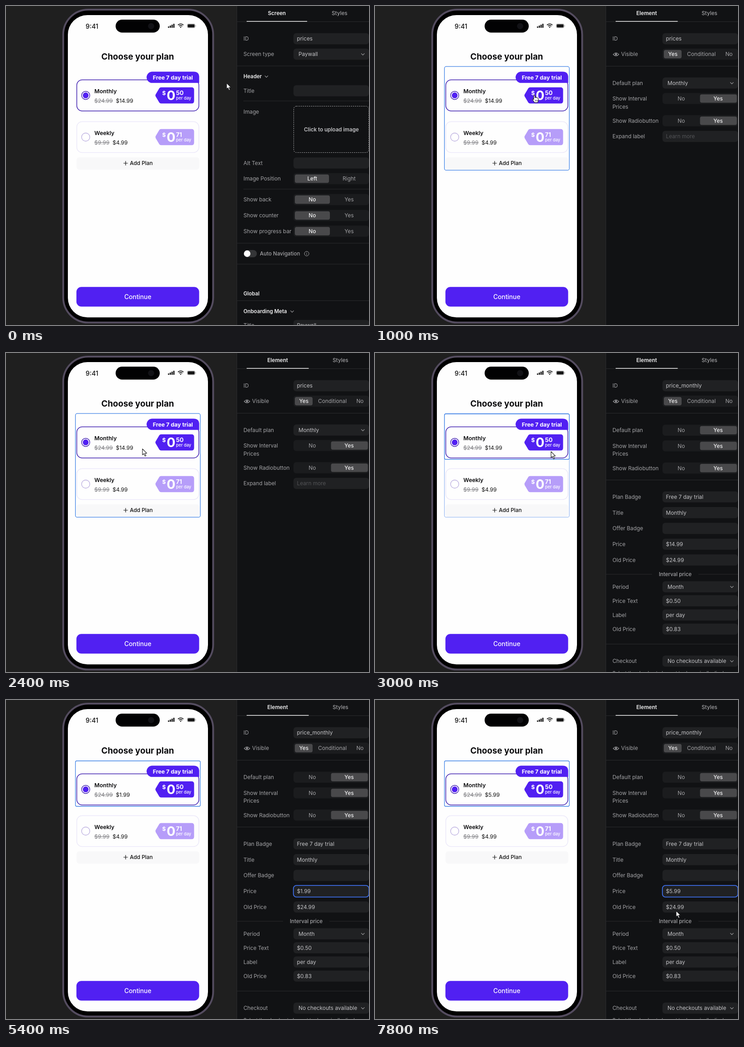
Animation, 798 px wide and 702 px high, one loop 8000 ms. Source, as an HTML page:

```html
<!DOCTYPE html>
<html lang="en">
<head>
<meta charset="utf-8">
<title>Paywall editor</title>
<style>
  html, body { margin: 0; width: 100%; height: 100%; overflow: hidden; background: #1f1f1f; }
  svg { display: block; width: 100vw; height: 100vh; }
  text { font-family: Inter, "Noto Sans", sans-serif; white-space: pre; }
</style>
</head>
<body>
<svg id="stage" viewBox="0 0 798 702" preserveAspectRatio="none"></svg>
<script>
const LOOP = 8000, STEP = 200;
const PURPLE = '#5120f2', EDGE = '#4020b0', BLUE = '#3f82e6';
const LABEL = '#a3a3a6', VALUE = '#c4c4c7', BRIGHT = '#f1f1f2';

// --- drawing helpers, all return markup ---
const el = (name, attrs, body = '') =>
  `<${name} ${Object.entries(attrs).map(([k, v]) => `${k}="${v}"`).join(' ')}>${body}</${name}>`;
const box = (x, y, w, h, rx, fill, more = {}) =>
  el('rect', { x, y, width: w, height: h, rx, fill, ...more });
const frame = (x, y, w, h, rx, stroke, sw, more = {}) =>
  box(x, y, w, h, rx, 'none', { stroke, 'stroke-width': sw, ...more });
const path = (d, more) => el('path', { d, fill: 'none', ...more });
const text = (x, y, s, size, weight, fill, more = {}) =>
  el('text', { x, y, 'font-size': size, 'font-weight': weight, fill, ...more }, s);
const centered = (x, y, s, size, weight, fill) =>
  text(x, y, s, size, weight, fill, { 'text-anchor': 'middle' });
const group = (id, body) => el('g', { id }, body);

// --- phone ---
function priceTag(dy, fill, cents) {
  return el('g', { transform: `translate(0 ${dy})` },
    path('M341 179H408Q413.5 179 413.5 184.500V209Q413.500 214.500 408 214.500H341Q338.500 214.500 337 212.500L329 199Q327.800 196.800 329 194.600L337 181Q338.500 179 341 179Z', { fill }) +
    text(343.3, 196.3, '$', 12.4, 700, '#fff') +
    text(353.3, 207.4, '0', 28.4, 700, '#fff') +
    text(373.7, 196.3, cents, 12.9, 700, '#fff') +
    text(373.7, 206.4, 'per day', 9.3, 500, '#fff'));
}

function oldPrice(y, s, width) {
  return text(194.3, y, s, 12, 400, '#7c7c80') +
    path(`M194 ${y - 4.2}h${width}`, { stroke: '#7c7c80', 'stroke-width': 1 });
}

function phone() {
  const bars = [3, 5, 7, 9].map((h, i) => box(356 + i * 3.9, 48 - h, 2.7, h, .8, '#111')).join('');
  const wifi = [[6, 41.8], [3.6, 44.3]].map(([r, y]) =>
    path(`M${384 - r} ${y}q${r} ${-r * .8} ${r * 2} 0`, { stroke: '#111', 'stroke-width': 1.8 })).join('') +
    path('M382.200 46.200q1.800 -1.500 3.600 0l-1.800 2z', { fill: '#111' });
  return box(125.8, 8, 329.6, 688.6, 55, '#000', { stroke: '#544c5f', 'stroke-width': 4 }) +
    box(136, 20, 308, 665.3, 43, '#fefefe') +
    text(175, 49.8, '9:41', 14.1, 500, '#111') +
    box(241, 30, 97, 28.5, 14.2, '#020203') +
    el('circle', { cx: 319, cy: 44.3, r: 6.8, fill: '#121216' }) +
    bars + wifi +
    frame(398.3, 39.2, 17.4, 9, 2.6, '#aaa', .9) + box(399.4, 40.2, 15.2, 7, 1.6, '#161616') +
    box(416.5, 42.2, 1.1, 3, .5, '#aaa') +
    centered(289.5, 118, 'Choose your plan', 18.7, 700, '#0c0c0e') +
    // monthly
    frame(155.6, 162.4, 268.4, 68.6, 12, EDGE, 1.5) +
    path('M321.500 144.500H412.500Q424.700 144.500 424.700 156.500V169.300H321.500A12.400 12.400 0 0 1 321.500 144.500Z', { fill: PURPLE }) +
    centered(366.8, 161.6, 'Free 7 day trial', 12.4, 700, '#fff') +
    el('circle', { cx: 175.2, cy: 196.7, r: 9, fill: '#fff', stroke: EDGE, 'stroke-width': 1.4 }) +
    el('circle', { cx: 175.2, cy: 196.7, r: 6.4, fill: PURPLE }) +
    text(194.3, 191.7, 'Monthly', 12.4, 600, '#0c0c0e') +
    oldPrice(213, '$24.99', 41) +
    text(241.5, 213, '', 12, 400, '#111', { id: 'planPrice' }) +
    priceTag(0, PURPLE, '50') +
    // weekly
    frame(155.6, 254.4, 268.4, 68.2, 12, '#ebe8f9', 1.5) +
    el('circle', { cx: 175.2, cy: 288.5, r: 9, fill: '#fff', stroke: '#b9acdf', 'stroke-width': 1.3 }) +
    text(194.3, 283.6, 'Weekly', 12.3, 600, '#0c0c0e') +
    oldPrice(304.8, '$9.99', 33.5) +
    text(234.2, 304.8, '$4.99', 12, 400, '#111') +
    priceTag(91.7, '#b69df9', '71') +
    box(155, 333, 270, 27, 6, '#f8f8f9') +
    path('M258.300 346h9.400M263 341.300v9.400', { stroke: '#111', 'stroke-width': 1.2 }) +
    text(272.2, 350.3, 'Add Plan', 11.8, 500, '#111') +
    box(154.8, 618.2, 269.8, 43.2, 11, PURPLE) +
    centered(289.7, 645, 'Continue', 13.8, 500, '#fff') +
    frame(152.6, 133.2, 274.6, 228.2, 4, BLUE, 1.3, { id: 'outerSel' }) +
    frame(152.6, 134, 274.6, 100, 3, BLUE, 1.3, { id: 'innerSel' });
}

// --- side panel ---
const SIZE = 11.8, BASE = 4.3;
const label = (y, s, x = 522) => text(x, y + BASE, s, SIZE, 400, LABEL);
const rule = (y, x = 508, end = 798) => path(`M${x} ${y}H${end}`, { stroke: '#2a2b2d', 'stroke-width': 1 });
const chevron = (x, y) => path(`M${x - 3.6} ${y - 1.7}l3.600 3.600l3.600 -3.600`, { stroke: LABEL, 'stroke-width': 1.1 });
const slot = y => box(632, y - 12.2, 166, 24.4, 6, '#202123');
const input = (y, s, fill = VALUE, id = '') =>
  slot(y) + text(639.5, y + BASE, s, SIZE, 400, fill, id ? { id } : {});
const select = (y, s) => slot(y) + text(643, y + BASE, s, SIZE, 400, VALUE) + chevron(784.5, y);
const heading = (y, s) => text(522, y + BASE, s, 11.4, 600, BRIGHT);

function choice(y, a, b, second, w = 77) {
  const x = second ? 714.5 : 635;
  return box(632, y - 12.2, 166, 24.4, 6, '#1b1c1e') +
    box(x, y - 9.2, second ? 81 : w, 18.4, 4, '#49494b') +
    centered(673.3, y + BASE, a, SIZE, second ? 400 : 500, second ? LABEL : BRIGHT) +
    centered(754.3, y + BASE, b, SIZE, second ? 500 : 400, second ? BRIGHT : LABEL);
}
const yesNo = (y, s, yes) => label(y, s) + choice(y, 'No', 'Yes', yes);

function tabs(first, x1, x2, end) {
  return centered(x1, 20.4, first, 11.6, 600, BRIGHT) + centered(x2, 20.4, 'Styles', 11.6, 500, LABEL) +
    rule(34.5) + box(529, 33, end - 529, 1.5, 0, '#ececec');
}

function screenPanel() {
  return tabs('Screen', 595.5, 733.3, 662) +
    label(72, 'ID') + input(72, 'prices') +
    label(106, 'Screen type') + select(106, 'Paywall') + rule(132) +
    heading(155, 'Header') + chevron(572.5, 155) +
    label(186.5, 'Title') + input(186.5, '') + rule(209, 522) +
    label(232.5, 'Image') +
    frame(632.5, 220.500, 165, 102, 6, '#a6a6a8', 1, { 'stroke-dasharray': '2.6 2' }) +
    centered(715.3, 275.9, 'Click to upload image', 11.6, 600, VALUE) +
    label(345.5, 'Alt Text') + input(345.5, '') +
    label(380, 'Image Position') + choice(380, 'Left', 'Right', false, 75) + rule(403, 522) +
    yesNo(426, 'Show back') + yesNo(461, 'Show counter') + yesNo(495.5, 'Show progress bar') +
    rule(522) + box(522.5, 537, 29, 16, 8, '#343537') +
    el('circle', { cx: 530.2, cy: 545, r: 7.2, fill: '#fff' }) +
    text(558, 549.4, 'Auto Navigation', 11.6, 500, LABEL) +
    el('circle', { cx: 661, cy: 545, r: 5, fill: 'none', stroke: LABEL }) +
    path('M661 544.500v3M661 542.300v1', { stroke: LABEL, 'stroke-width': 1.1 }) +
    rule(568) + heading(633, 'Global') + rule(648.5) +
    heading(672, 'Onboarding Meta') + chevron(629, 672) +
    label(703, 'Title') + input(703, 'Paywall');
}

function elementTop(id) {
  return tabs('Element', 597.2, 735.3, 665.5) +
    label(72, 'ID') + input(72, id) +
    path('M523.500 106.500q6.300 -6.800 12.600 0q-6.300 6.400 -12.600 0z', { stroke: LABEL, 'stroke-width': 1.1 }) +
    el('circle', { cx: 529.8, cy: 106.3, r: 2.1, fill: LABEL }) +
    label(106, 'Visible', 541) +
    box(632, 93.8, 166, 24.4, 6, '#1b1c1e') + box(635, 96.8, 39, 18.4, 4, '#49494b') +
    centered(654.8, 110.3, 'Yes', SIZE, 500, BRIGHT) +
    centered(717.6, 110.3, 'Conditional', SIZE, 400, LABEL) +
    centered(778.2, 110.3, 'No', SIZE, 400, LABEL) + rule(132.500);
}

const intervalToggles = y => yesNo(y, 'Show Interval', true) + label(y + 17.7, 'Prices') +
  yesNo(y + 48.9, 'Show Radiobutton', true);

function listPanel() {
  return elementTop('prices') +
    label(169.5, 'Default plan') + select(169.5, 'Monthly') + intervalToggles(203.6) +
    label(287, 'Expand label') + input(287, 'Learn more', '#525356');
}

function planPanel() {
  const row = (y, name, value, id) => label(y, name) + input(y, value, VALUE, id);
  return elementTop('price_monthly') +
    yesNo(169.9, 'Default plan', true) + intervalToggles(204.4) + rule(279.5) +
    row(316.6, 'Plan Badge', 'Free 7 day trial') + row(351.3, 'Title', 'Monthly') +
    row(386, 'Offer Badge', '') + row(420.8, 'Price', '', 'fieldPrice') +
    frame(631.8, 408.2, 166, 25.4, 6.5, '#3e6ee8', 1.8, { id: 'focus' }) +
    row(455.5, 'Old Price', '$24.99') +
    rule(487, 508, 609) + rule(487, 711) +
    centered(660, 491.3, 'Interval price', 11.5, 500, LABEL) +
    label(514.5, 'Period') + select(514.5, 'Month') +
    row(545.3, 'Price Text', '$0.50') + row(576.5, 'Label', 'per day') + row(607.6, 'Old Price', '$0.83') +
    rule(640.5) + label(678, 'Checkout') + select(678, 'No checkouts available') +
    text(522, 708, 'Select the checkout element to dynamically display', 10.6, 400, LABEL);
}

// --- pointers, with the hot spot at 0,0 ---
const arrow = path('M0 0V13.200L3 10.500L5.400 15.900L7.700 14.900L5.300 9.700H9.500Z',
  { fill: '#fff', stroke: '#1b1b1d', 'stroke-width': 1.1, 'stroke-linejoin': 'round' });
const hand = path('M-4 -6.500Q-4 -8 -2.700 -8T-1.300 -6.500V-2.500Q0.500 -3.800 1.700 -2.200Q3.200 -3 4 -1.500Q6 -1.800 6 0.500V3.500Q6 6 4.500 8.500H-2.500Q-4 5.500 -6.600 2.500Q-7 0.800 -5.500 0.800L-4 2Z',
  { fill: '#fff', stroke: '#1b1b1d', 'stroke-width': 1.1, 'stroke-linejoin': 'round' }) +
  path('M-.5 2.500v3.500M1.700 2.500v3.500M3.900 2.500v3.500', { stroke: '#1b1b1d', 'stroke-width': .8 });
const ibeamPath = 'M-3.300 -7.500Q0 -7.500 0 -5.500Q0 -7.500 3.300 -7.500M0 -5.500V5.500M-3.300 7.500Q0 7.500 0 5.500Q0 7.500 3.300 7.500M-2 1.800H2';
const ibeam = path(ibeamPath, { stroke: '#111', 'stroke-width': 2.4 }) +
  path(ibeamPath, { stroke: '#eee', 'stroke-width': 1.2 });

document.getElementById('stage').innerHTML =
  box(0, 0, 798, 702, 0, '#1f1f1f') + phone() +
  box(508, 0, 290, 702, 0, '#111214') + box(507, 0, 1, 702, 0, '#2b2b2d') +
  group('screen', screenPanel()) + group('list', listPanel()) + group('plan', planPanel()) +
  group('pointer', group('arrow', arrow) + group('hand', hand) + group('ibeam', ibeam));

// --- timeline ---
const $ = id => document.getElementById(id);
const show = (id, on) => $(id).setAttribute('display', on ? 'inline' : 'none');
const at = (list, t) => list.filter(k => k[0] <= t).pop()[1];

const MOVES = [[0, 485, 169.5], [200, 485, 169.5], [800, 353, 204], [1500, 353, 204], [2200, 297, 209],
  [2400, 300, 211], [3000, 387, 217], [3400, 390, 218], [4200, 657, 419.5], [6800, 657, 419.5], [7600, 662, 464], [8000, 662, 464]];
const POINTERS = [[0, 'arrow'], [800, 'hand'], [1600, 'arrow'], [4200, 'ibeam'], [5200, 'none'], [7200, 'arrow']];
const PANELS = [[0, 'screen'], [1000, 'list'], [2800, 'plan']];
const PRICES = [[0, '$14.99'], [5400, '$1.99'], [5800, '$.99'], [6800, '$5.99']];

function pointerAt(t) {
  const i = Math.max(1, MOVES.findIndex(k => k[0] > t));
  const [t0, x0, y0] = MOVES[i - 1], [t1, x1, y1] = MOVES[i];
  const p = (t - t0) / (t1 - t0), e = p * p * (3 - 2 * p);
  return [x0 + (x1 - x0) * e, y0 + (y1 - y0) * e];
}

function render(ms) {
  const t = Math.floor((ms % LOOP) / STEP) * STEP;
  const panel = at(PANELS, t), kind = at(POINTERS, t), price = at(PRICES, t);
  for (const p of ['screen', 'list', 'plan']) show(p, p === panel);
  for (const k of ['arrow', 'hand', 'ibeam']) show(k, k === kind);
  $('pointer').setAttribute('transform', `translate(${pointerAt(t)})`);
  show('outerSel', t >= 800 && t < 3800);
  $('outerSel').setAttribute('stroke', panel === 'plan' ? '#9dbcf2' : BLUE);
  show('innerSel', panel === 'plan');
  show('focus', t >= 4800);
  $('planPrice').textContent = $('fieldPrice').textContent = price;
}

const start = performance.now();
function tick() {
  render(performance.now() - start);
  requestAnimationFrame(tick);
}
render(0);
requestAnimationFrame(tick);
</script>
</body>
</html>
```
